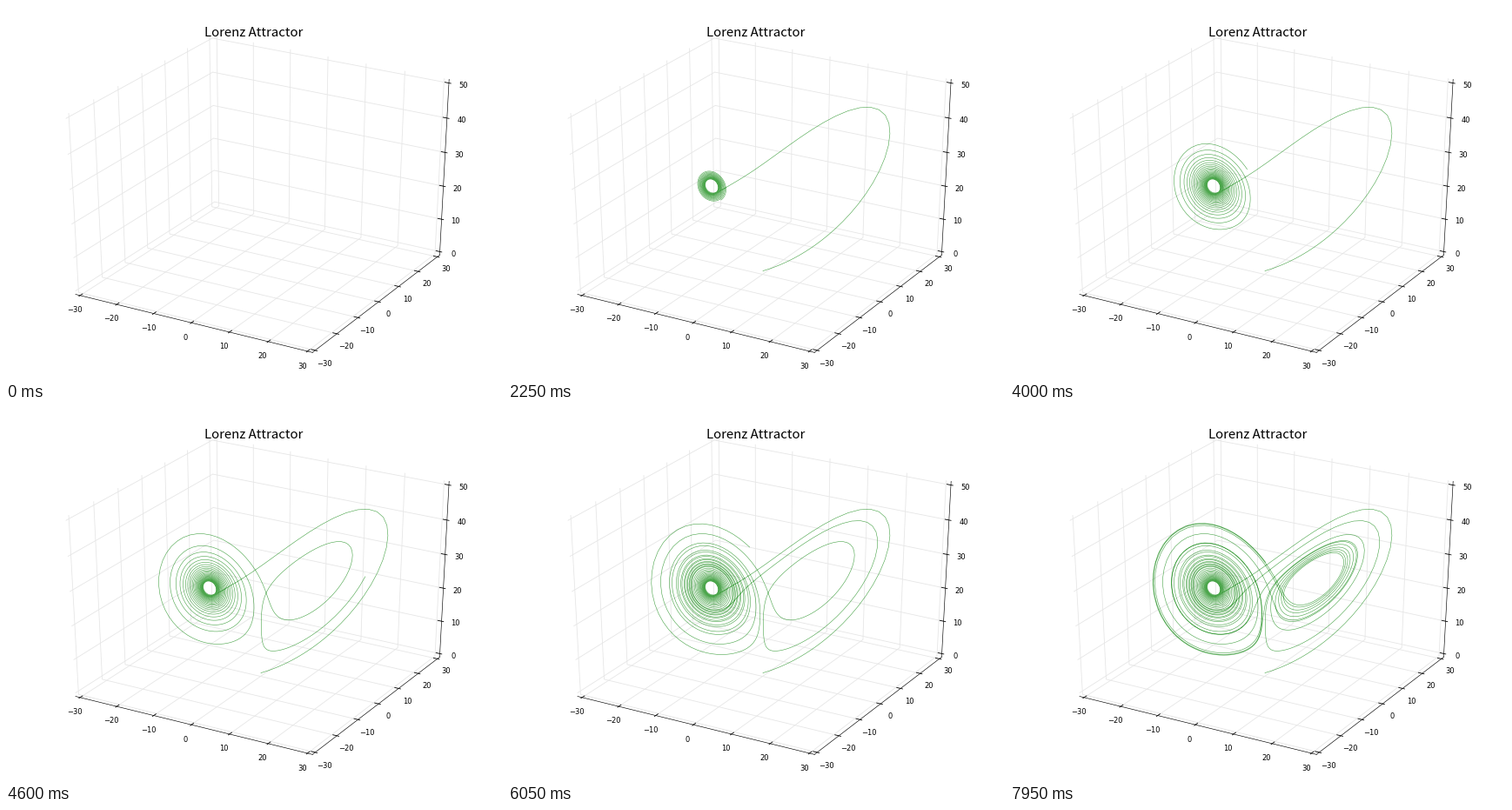
Recreate the animation shown at these times as a matplotlib script. Size 570x430 px, loop 8000 ms.

```python
import numpy as np
import matplotlib.pyplot as plt
from matplotlib.animation import FuncAnimation
from matplotlib.collections import LineCollection

W, H, DPI = 570, 430, 100
FRAMES, INTERVAL = 160, 50
STEPS = 20                 # samples added per frame
DT = 100 / 9999            # time between samples
SUB = 10                   # integration substeps per sample
PT = 0.6                   # line and font scale
EDGE = 0.5 + 1 / 48        # box edge, in units of the axis range
TICK_IN, TICK_OUT = 0.2 / 12, 0.1 / 12
PAD = 0.041                # tick label distance


def lorenz(p):
    x, y, z = p
    return np.array([10 * (y - x), x * (28 - z) - y, x * y - 8 / 3 * z])


def rk4(p, h):
    a = lorenz(p)
    b = lorenz(p + h / 2 * a)
    c = lorenz(p + h / 2 * b)
    d = lorenz(p + h * c)
    return p + h / 6 * (a + 2 * b + 2 * c + d)


def trajectory(n):
    p = np.array([0.1, 0.0, 0.0])
    pts = [p]
    for _ in range(n):
        for _ in range(SUB):
            p = rk4(p, DT / SUB)
        pts.append(p)
    return np.array(pts)


elev, azim = np.radians(30), np.radians(-60)
NORMAL = np.array([np.cos(azim) * np.cos(elev),
                   np.sin(azim) * np.cos(elev), np.sin(elev)])
RIGHT = np.array([-np.sin(azim), np.cos(azim), 0])
UP = np.cross(NORMAL, RIGHT)


def project(pts):
    """Unit-box points, centred on 0, to stage pixels with y up."""
    pts = np.asarray(pts, float)
    depth = 10 - pts @ NORMAL
    x = 6 + 558 * (pts @ RIGHT / depth + 0.095) / 0.185
    y = 6 + 418.5 * (pts @ UP / depth + 0.095) / 0.185
    return np.stack([x, y], axis=-1)


fig = plt.figure(figsize=(W / DPI, H / DPI), dpi=DPI, facecolor="white")
ax = fig.add_axes([0, 0, 1, 1])
ax.set_xlim(0, W)
ax.set_ylim(0, H)
ax.axis("off")


def draw_line(pts, width):
    ax.plot(*project(pts).T, color="black", lw=width * PT, zorder=2)


def draw_axis(dim, base, tick_dim, values, grid_path):
    """Axis line, grid, ticks and labels along dim; base is its edge point."""
    def at(value, point):
        q = np.array(point, float)
        q[dim] = value
        return q

    base = np.array(base, float)
    draw_line([at(-EDGE, base), at(EDGE, base)], 0.75)
    out = np.sign(base)
    out[dim] = 0
    tick = np.zeros(3)
    tick[tick_dim] = out[tick_dim]
    grid = []
    for pos, value in zip(np.linspace(-0.5, 0.5, len(values)), values):
        grid.append(project([at(pos, q) for q in grid_path]))
        p = at(pos, base)
        draw_line([p + TICK_OUT * tick, p - TICK_IN * tick], 1)
        x, y = project(p + PAD * out)
        ax.text(x, y, str(value).replace("-", "\u2212"), ha="center", va="top",
                family="DejaVu Sans", size=10 * PT, color="black")
    ax.add_collection(LineCollection(grid, colors="0.9", linewidths=PT, zorder=1))


E = EDGE
side = range(-30, 31, 10)
draw_axis(0, (0, -E, -E), 1, side, [(0, -E, -E), (0, E, -E), (0, E, E)])
draw_axis(1, (E, 0, -E), 0, side, [(E, 0, -E), (-E, 0, -E), (-E, 0, E)])
draw_axis(2, (E, E, 0), 0, range(0, 51, 10), [(-E, -E, 0), (-E, E, 0), (E, E, 0)])

ax.text(W / 2, 395.2, "Lorenz Attractor", ha="center", va="baseline",
        family="Noto Sans CJK JP", size=10.75, color="black")

path = project(trajectory(STEPS * (FRAMES - 1)) / [60, 60, 50] - [0, 0, 0.5])
curve, = ax.plot([], [], color=(0, 0.5, 0), alpha=0.7, lw=0.7 * PT, zorder=3)


def update(i):
    curve.set_data(*path[:STEPS * i + 1].T)
    return curve,


anim = FuncAnimation(fig, update, frames=FRAMES, interval=INTERVAL,
                     repeat=True, repeat_delay=0)
plt.show()
```
